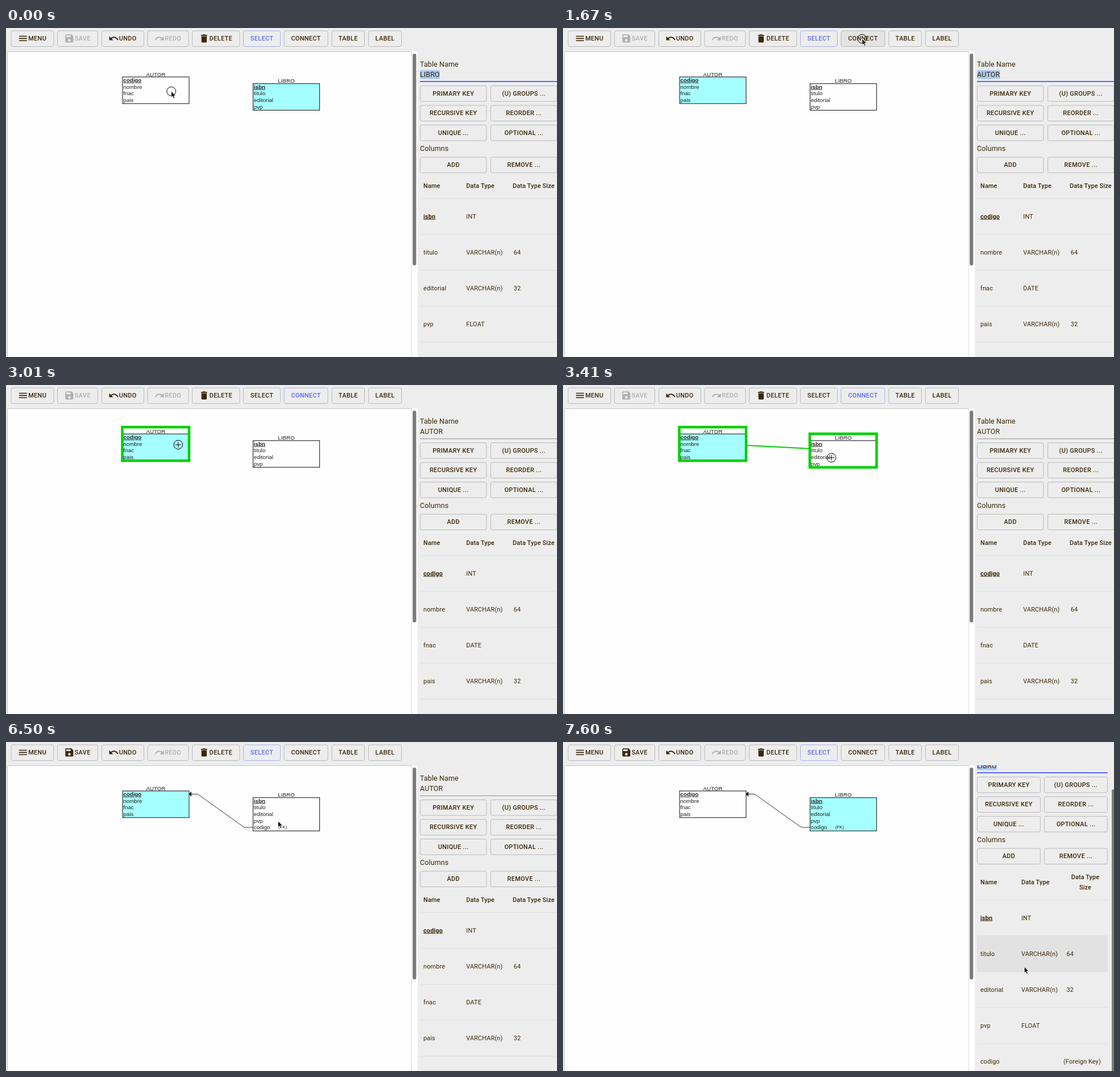
Animation of 969 by 578 pixels, one loop 8000 ms. Source, as an HTML page:

```html
<!DOCTYPE html>
<html lang="es">
<head>
<meta charset="utf-8">
<title>Table designer</title>
<style>
  html, body { margin: 0; width: 100%; height: 100%; overflow: hidden; background: #ededed; }
  svg { display: block; }
  text { fill: #3b2709; font-family: Roboto, sans-serif; font-size: 10.95px; letter-spacing: .0107em; white-space: pre; }
  .btn rect { fill: none; stroke: #b9b9b9; }
  .btn text { font-weight: 500; letter-spacing: .0286em; }
  .btn path { fill: #3b2709; }
  .btn.active rect { stroke: #a6b0f0; }
  .btn.active text { fill: #5b6af5; }
  .btn.off text, .btn.off path { fill: #b0b0b0; }
  .btn.hover rect { fill: #e3e3e3; }
  .body { font-size: 12.5px; letter-spacing: .0094em; }
  .head { font-weight: 500; }
  .key { font-weight: 700; text-decoration: underline; }
  .mid { text-anchor: middle; }
  .table text { fill: #222; font-family: "Liberation Sans", Arial, sans-serif; font-size: 9.75px; letter-spacing: 0; }
  .table .fk { font-size: 7.7px; }
  .box { stroke: #333; stroke-width: 1.2; }
  .glow { fill: none; stroke: #00d000; stroke-width: 4.5; }
  .rule { stroke: #dfdfdf; }
</style>
</head>
<body>
<svg id="stage" width="969" height="578" viewBox="0 0 969 578"></svg>
<script>
const LOOP = 8000;
const stage = document.getElementById('stage');
const $ = id => document.getElementById(id);

const icons = {
  MENU: 'M3 18h18v-2H3zM3 13h18v-2H3zM3 6v2h18V6z',
  SAVE: 'M17 3H5a2 2 0 0 0-2 2v14a2 2 0 0 0 2 2h14a2 2 0 0 0 2-2V7zM12 19a3 3 0 1 1 0-6 3 3 0 0 1 0 6zM15 9H5V5h10z',
  UNDO: 'M12.5 8c-2.65 0-5.05 1-6.9 2.6L2 7v9h9l-3.6-3.6c1.4-1.2 3.1-1.9 5.1-1.9 3.5 0 6.5 2.3 7.6 5.5l2.4-.8C21.1 11 17.1 8 12.5 8z',
  DELETE: 'M6 19a2 2 0 0 0 2 2h8a2 2 0 0 0 2-2V7H6zM19 4h-3.5l-1-1h-5l-1 1H5v2h14z'
};

const text = (x, y, s, cls = '') => `<text x="${x}" y="${y}" class="${cls}">${s}</text>`;
const line = (x1, x2, y, cls, extra = '') =>
  `<line x1="${x1}" x2="${x2}" y1="${y}" y2="${y}" class="${cls}" ${extra}/>`;

function button(x, y, w, label) {
  const path = icons[label === 'REDO' ? 'UNDO' : label];
  const place = label === 'REDO'
    ? `translate(${x + 30.7} ${y + 4.5}) scale(-.78 .78)`
    : `translate(${x + 12} ${y + 4.5}) scale(.78)`;
  return `<g class="btn" id="${label}">
    <rect x="${x + .5}" y="${y + .5}" width="${w - 1}" height="27.5" rx="3"/>
    ${path ? `<path transform="${place}" fill-rule="evenodd" d="${path}"/>` : ''}
    ${path ? text(x + 30.7, y + 17.8, label) : text(x + w / 2, y + 17.8, label, 'mid')}</g>`;
}

const tables = {
  AUTOR: [['codigo', 'INT', ''], ['nombre', 'VARCHAR(n)', '64'], ['fnac', 'DATE', ''], ['pais', 'VARCHAR(n)', '32']],
  LIBRO: [['isbn', 'INT', ''], ['titulo', 'VARCHAR(n)', '64'], ['editorial', 'VARCHAR(n)', '32'], ['pvp', 'FLOAT', '']]
};

function tableBox(name, x, y) {
  const rows = tables[name].map(([col], i) => text(x + 1.3, y + 8.9 + i * 11.75, col, i ? '' : 'key'));
  return `<g class="table">
    <rect id="box${name}" class="box" x="${x}" y="${y}" width="117" height="46.8"/>
    ${rows.join('')}
    ${text(x + 58.5, y - 1.4, name, 'mid')}
    <rect id="glow${name}" class="glow" x="${x - .5}" y="${y - 12}" width="117.5" height="59"/></g>`;
}

// The narrow layout makes room for a scrollbar and a foreign key row.
function panel(id, name, narrow) {
  const right = narrow ? 958 : 969.5;
  const w = narrow ? 112 : 117.5;
  const typeX = narrow ? 806 : 809.3;
  const top = narrow ? 317.5 : 299.5;
  const rows = tables[name].concat(narrow ? [['codigo', '', '']] : []);
  const pairs = [[101, 'PRIMARY KEY', '(U) GROUPS ...'], [135.5, 'RECURSIVE KEY', 'REORDER ...'],
    [170, 'UNIQUE ...', 'OPTIONAL ...'], [226.5, 'ADD', 'REMOVE ...']];
  return `<g id="${id}">
    ${narrow ? '<rect id="hover" x="728" y="381" width="230" height="63" fill="#e2e2e2"/>' : ''}
    ${text(728, 67.7, 'Table Name', 'body')}
    <rect class="marked" x="728" y="74" width="${name === 'AUTOR' ? 40.5 : 35}" height="15.5" fill="#a9cbf3"/>
    ${text(728, 86.4, name, 'body')}
    ${line(728, right, 94.5, '', 'stroke="#919191"')}
    <rect class="focus" x="728" y="93" width="${right - 728}" height="2" fill="#5b6af5"/>
    ${pairs.map(([y, a, b]) => button(728, y, w, a) + button(right - w, y, w, b)).join('')}
    ${text(728, 216.3, 'Columns', 'body')}
    ${text(734, narrow ? 290 : 280.8, 'Name', 'head')}
    ${text(typeX, narrow ? 290 : 280.8, 'Data Type', 'head')}
    ${narrow ? text(918.5, 280.8, 'Data Type', 'head mid') + text(918.5, 299, 'Size', 'head mid')
      : text(891, 280.8, 'Data Type Size', 'head')}
    ${line(728, right, top, 'rule')}
    ${rows.map(([col, type, size], i) => {
      const y = top + 35 + i * 63.1;
      return text(734, y, col, i ? '' : 'key') + text(typeX, y, type) +
        text(narrow ? 885.5 : 892.7, y, size) + line(728, right, top + 63.1 * (i + 1), 'rule');
    }).join('')}
    ${narrow ? text(880, top + 35 + 4 * 63.1, '(Foreign Key)') : ''}</g>`;
}

const toolbar = [[8.5, 76, 'MENU'], [90, 72, 'SAVE'], [168, 75, 'UNDO'], [248.5, 73, 'REDO'], [327, 84.5, 'DELETE'],
  [417, 66, 'SELECT'], [488.5, 78, 'CONNECT'], [572.5, 58.5, 'TABLE'], [637, 59, 'LABEL']];

stage.innerHTML = `
  <clipPath id="below"><rect x="724" y="41" width="245" height="537"/></clipPath>
  <rect width="969" height="578" fill="#ededed"/>
  <rect x="2" y="41" width="722" height="537" fill="#fefefe"/>
  <path d="M2.5 578V41.5H713" fill="none" stroke="#c6c6c6"/>
  <path d="M713.5 41V578" stroke="#dedede"/>
  <rect x="715.2" y="45" width="6.2" height="372" rx="3.1" fill="#7b7b7b"/>
  ${toolbar.map(([x, w, label]) => button(x, 4.5, w, label)).join('')}
  ${tableBox('AUTOR', 205, 86)}
  ${tableBox('LIBRO', 434.5, 97.7)}
  <g id="relation" class="table">
    <path d="M322 91.5H337L419 150H434.5" fill="none" stroke="#333"/>
    <path d="M321.5 91.5l4.5-4.5v9z" fill="#000"/>
    ${text(435.8, 153.4, 'codigo')}${text(479, 152.4, '(FK)', 'fk')}
  </g>
  <line id="band" stroke="#00d000" stroke-width="2"/>
  <g clip-path="url(#below)">
    <g id="scroller">${panel('first', 'LIBRO')}${panel('second', 'AUTOR')}${panel('third', 'LIBRO', true)}</g>
    <rect id="thumb" x="965" y="45" width="6.2" height="600" rx="3.1" fill="#7b7b7b"/>
  </g>
  <g id="pointer">
    <circle id="press" r="7.8" fill="none" stroke="#000"/>
    <path id="arrow" d="M0 0V10.6L2.5 8.4 4.3 12.6 6.2 11.8 4.4 7.7H7.8z" fill="#000" stroke="#fff" stroke-width=".8"/>
    <path id="cross" d="M-5 0H5M0-5V5" stroke="#000"/>
  </g>`;

const track = [[0, 290.7, 111.3], [930, 290.7, 111.3], [1610, 526, 19], [1760, 526, 19], [2370, 307.5, 98.5],
  [2420, 303.5, 98], [2470, 303.5, 98], [2710, 289, 103], [2930, 289, 103], [3410, 472, 127.8], [3945, 472, 127.8],
  [3950, 470, 128], [4490, 470, 128], [4540, 469, 136.5], [4710, 462.8, 148], [4900, 462.8, 148], [5060, 455, 148],
  [6495, 455, 148], [6500, 478.5, 139], [6690, 478.5, 139], [7250, 787, 353], [7290, 787, 353], [7370, 811.3, 395]];
const presses = [[0, 90], [830, 950], [1670, 1790], [2890, 3830], [6560, 6680]];

const within = (t, a, b) => t >= a && t < b;
const ramp = (t, a, d) => Math.min(1, Math.max(0, (t - a) / d));
const show = (id, on) => $(id).setAttribute('visibility', on ? 'visible' : 'hidden');
const mark = (id, cls, on) => $(id).classList.toggle(cls, on);

function pointerAt(t) {
  const i = track.findIndex(p => p[0] > t);
  if (i < 0) return track[track.length - 1].slice(1);
  const [a, ax, ay] = track[i - 1], [b, bx, by] = track[i];
  const u = (t - a) / (b - a);
  const k = b - a > 400 ? u * u * (3 - 2 * u) : u;
  return [ax + (bx - ax) * k, ay + (by - ay) * k];
}

const marks = stage.querySelectorAll('.marked');
const focusLines = stage.querySelectorAll('.focus');

function draw(t) {
  const [x, y] = pointerAt(t);
  const linked = t >= 3830;
  const connecting = within(t, 1700, 3830);
  const dragging = within(t, 2890, 3830);
  const autor = within(t, 830, 6560);

  $('pointer').setAttribute('transform', `translate(${x} ${y})`);
  const crosshair = within(t, 1700, 3950) && y > 41;
  show('press', presses.some(([a, b]) => within(t, a, b)));
  show('cross', crosshair);
  show('arrow', !crosshair);

  mark('SAVE', 'off', !linked);
  mark('REDO', 'off', true);
  mark('SELECT', 'active', !connecting);
  mark('CONNECT', 'active', connecting);
  mark('CONNECT', 'hover', within(x, 488, 567) && y < 33);

  $('boxAUTOR').setAttribute('fill', autor ? '#a6ffff' : '#fefefe');
  $('boxLIBRO').setAttribute('fill', autor ? '#fefefe' : '#a6ffff');
  $('boxLIBRO').setAttribute('height', linked ? 58.5 : 46.8);
  show('relation', linked);

  // The band runs between centres and is hidden inside the tables.
  const overLibro = x > 434.5 && y > 86;
  show('glowAUTOR', dragging);
  show('glowLIBRO', dragging && overLibro);
  show('band', dragging && x > 323);
  const [ex, ey] = overLibro ? [493, 115] : [x, y];
  const slope = (ey - 103) / (ex - 263.5);
  const endX = overLibro ? 433 : ex;
  const band = { x1: 323, y1: 103 + slope * 59.5, x2: endX, y2: 103 + slope * (endX - 263.5) };
  for (const key in band) $('band').setAttribute(key, band[key]);

  show('first', t < 830);
  show('second', autor);
  show('third', t >= 6560);
  show('thumb', t >= 6560);
  const selected = !within(t, 1730, 6560);
  marks.forEach(m => m.setAttribute('opacity', selected ? 1 : 0));
  const grow = t < 830 ? 1 : t < 1700 ? ramp(t, 830, 200) : t < 6560 ? 1 - ramp(t, 1700, 200) : ramp(t, 6560, 200);
  focusLines.forEach(f => {
    const full = f.closest('#third') ? 230 : 241.5;
    f.setAttribute('x', 728 + full * (1 - grow) / 2);
    f.setAttribute('width', full * grow);
  });

  const scroll = t < 7550 ? 0 : t < 7600 ? 22 : 40;
  $('scroller').setAttribute('transform', `translate(0 ${-scroll})`);
  $('thumb').setAttribute('y', 45 + scroll * .95);
  $('hover').setAttribute('opacity', scroll ? 1 : 0);
}

const start = performance.now();
function frame() {
  draw((performance.now() - start) % LOOP);
  requestAnimationFrame(frame);
}
draw(0);
requestAnimationFrame(frame);
</script>
</body>
</html>
```
